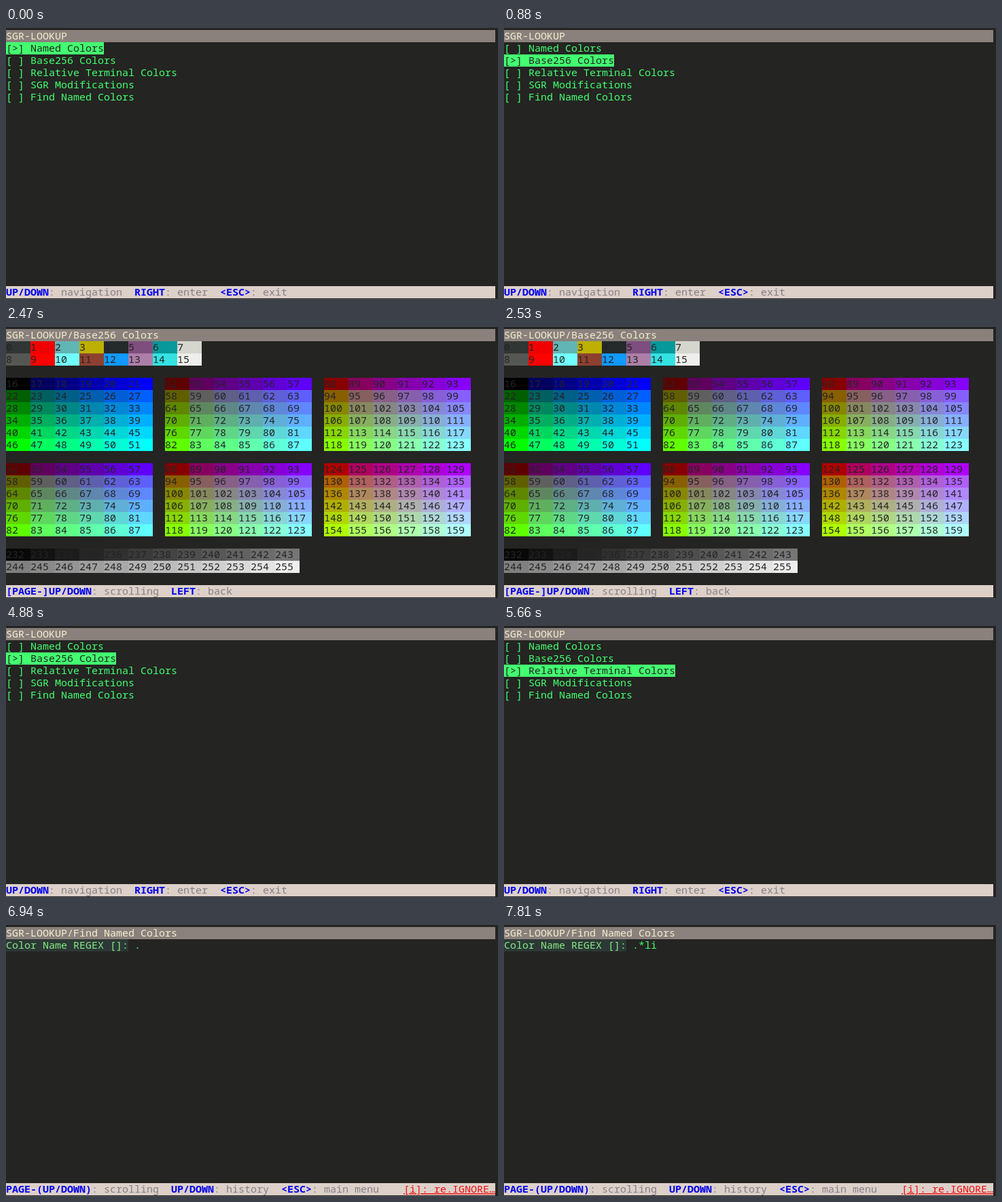
Write an HTML page that moves like this. It is 724 px wide and 400 px high and loops after 8 s.

```html
<!DOCTYPE html>
<html lang="en">
<head>
<meta charset="utf-8">
<title>SGR-LOOKUP</title>
<style>
  html, body { margin: 0; width: 100%; height: 100%; overflow: hidden; background: #242422; }
  svg { display: block; width: 724px; height: 400px; }
  text { font: 15px "Noto Sans Mono", "DejaVu Sans Mono", monospace; white-space: pre; font-variant-ligatures: none; }

  .bar { fill: #8a817c; }
  .title { fill: #f4eed0; }
  .foot { fill: #ddd0c9; }
  .hint { fill: #858084; }
  .key { fill: #0000ee; font-weight: 700; }
  .flag { fill: #f01010; text-decoration: underline; }
  .green { fill: #43ff70; }
  .dark { fill: #242422; }
  .prompt { fill: #86e884; }
  .promptbg { fill: #2c3835; }

  .step { opacity: 0; animation: 8s step-end infinite; }
  #menu { animation-name: menu; }
  #palette { animation-name: palette; }
  #find { animation-name: find; }
  #opt0 { animation-name: opt0; }
  #opt1 { animation-name: opt1; }
  #opt2 { animation-name: opt2; }
  #opt3 { animation-name: opt3; }
  #opt4 { animation-name: opt4; }
  #char0 { animation-name: char0; }
  #char1 { animation-name: char1; }
  #char2 { animation-name: char2; }
  #char3 { animation-name: char3; }

  /* views */
  @keyframes menu { 0%, 61% { opacity: 1 } 30.875%, 80.875%, 100% { opacity: 0 } }
  @keyframes palette { 0%, 61%, 100% { opacity: 0 } 30.875% { opacity: 1 } }
  @keyframes find { 0% { opacity: 0 } 80.875%, 100% { opacity: 1 } }

  /* selected menu entry */
  @keyframes opt0 { 0% { opacity: 1 } 10.125%, 100% { opacity: 0 } }
  @keyframes opt1 { 0%, 17.625%, 67.625%, 100% { opacity: 0 } 10.125%, 23.5% { opacity: 1 } }
  @keyframes opt2 { 0%, 23.5%, 72.625%, 100% { opacity: 0 } 17.625%, 67.625% { opacity: 1 } }
  @keyframes opt3 { 0%, 76.625%, 100% { opacity: 0 } 72.625% { opacity: 1 } }
  @keyframes opt4 { 0% { opacity: 0 } 76.625%, 100% { opacity: 1 } }

  /* typed characters */
  @keyframes char0 { 0% { opacity: 0 } 86.75%, 100% { opacity: 1 } }
  @keyframes char1 { 0% { opacity: 0 } 88.25%, 100% { opacity: 1 } }
  @keyframes char2 { 0% { opacity: 0 } 92.625%, 100% { opacity: 1 } }
  @keyframes char3 { 0% { opacity: 0 } 94.875%, 100% { opacity: 1 } }
</style>
</head>
<body>
<svg id="screen" viewBox="0 0 724 400"></svg>
<script>
  const CW = 9, CH = 18, TOP = 3, FOOT = 21;

  const esc = s => s.replace(/&/g, "&amp;").replace(/</g, "&lt;").replace(/>/g, "&gt;");
  const rowY = row => TOP + row * CH;
  const text = (col, row, cls, s) =>
    `<text x="${col * CW}" y="${rowY(row) + 14}" class="${cls}">${esc(s)}</text>`;
  const box = (col, row, cols, attr) =>
    `<rect x="${col * CW}" y="${rowY(row)}" width="${cols * CW}" height="${CH}" shape-rendering="crispEdges" ${attr}/>`;
  const step = (id, body) => `<g id="${id}" class="step">${body}</g>`;

  function frame(title, hints) {
    let out = box(0, 0, 80, 'class="bar"') + text(0, 0, "title", title) + box(0, FOOT, 80, 'class="foot"');
    let col = 0;
    for (const [key, what] of hints) {
      out += text(col, FOOT, "key", key) + text(col + key.length, FOOT, "hint", ": " + what);
      col += key.length + what.length + 4;
    }
    return out;
  }

  // Main menu
  const options = ["Named Colors", "Base256 Colors", "Relative Terminal Colors", "SGR Modifications", "Find Named Colors"];

  function menuView() {
    let out = frame("SGR-LOOKUP", [["UP/DOWN", "navigation"], ["RIGHT", "enter"], ["<ESC>", "exit"]]);
    options.forEach((name, i) => {
      out += text(0, i + 1, "green", "[ ] " + name);
      out += step("opt" + i, box(0, i + 1, name.length + 4, 'class="green"') + text(0, i + 1, "dark", "[>] " + name));
    });
    return out;
  }

  // 256 colour palette
  const base = ["#303634", "#f00000", "#62b5b5", "#bdb000", "#24292a", "#7e4e7e", "#06989a", "#d5d7cf",
                "#555753", "#ff0000", "#72ffff", "#8d4030", "#1199ff", "#ad7fa8", "#34e2e2", "#eeeeec"];

  function color(n) {
    if (n < 16) return base[n];
    if (n > 231) {
      const v = 8 + 10 * (n - 232);
      return `rgb(${v},${v},${v})`;
    }
    const level = k => k ? 55 + 40 * k : 0;
    const i = n - 16;
    return `rgb(${level(Math.floor(i / 36))},${level(Math.floor(i / 6) % 6)},${level(i % 6)})`;
  }

  function grid(col, row, first, cols, rows) {
    let out = "";
    for (let i = 0; i < cols * rows; i++) {
      const c = col + (i % cols) * 4, r = row + Math.floor(i / cols);
      out += box(c, r, 4, `fill="${color(first + i)}"`) + text(c, r, "dark", String(first + i));
    }
    return out;
  }

  function paletteView() {
    let out = frame("SGR-LOOKUP/Base256 Colors", [["[PAGE-]UP/DOWN", "scrolling"], ["LEFT", "back"]]);
    out += grid(0, 1, 0, 8, 2);
    for (let i = 0; i < 3; i++) {
      out += grid(i * 26, 4, 16 + 36 * i, 6, 6);
      out += grid(i * 26, 11, 52 + 36 * i, 6, 6);
    }
    return out + grid(0, 18, 232, 12, 2);
  }

  // Search prompt
  function findView() {
    const label = "Color Name REGEX []:";
    let out = frame("SGR-LOOKUP/Find Named Colors",
      [["PAGE-(UP/DOWN)", "scrolling"], ["UP/DOWN", "history"], ["<ESC>", "main menu"]]);
    out += text(65, FOOT, "flag", "[i]: re.IGNORE…");
    out += box(0, 1, label.length, 'class="promptbg"') + text(0, 1, "prompt", label);
    [...".*li"].forEach((ch, i) => {
      out += step("char" + i, text(label.length + 1 + i, 1, "green", ch));
    });
    return out;
  }

  document.getElementById("screen").innerHTML =
    step("menu", menuView()) + step("palette", paletteView()) + step("find", findView());
</script>
</body>
</html>
```
